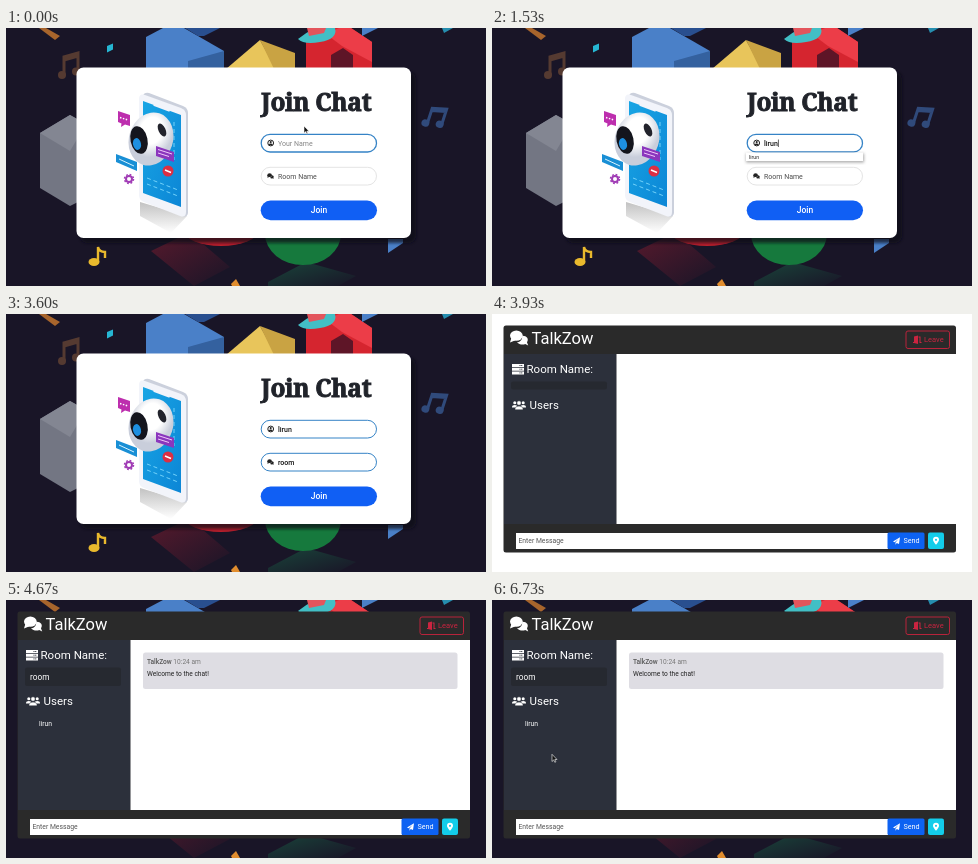
Animation of 480 by 258 pixels, one loop 8 s. Source, as an HTML page:

```html
<!DOCTYPE html>
<html lang="en">
<head>
<meta charset="utf-8">
<title>Join a chat room</title>
<style>
  html, body { margin: 0; width: 100%; height: 100%; overflow: hidden; background: #191527; }
  svg { display: block; width: 100%; height: 100%; }
  text { font-family: Roboto, sans-serif; white-space: pre; }
  .title { font: 900 24.5px "Noto Serif", serif; letter-spacing: -.35px; }
  .small { font-size: 7px; }
  .heading { font-size: 11.5px; }
</style>
</head>
<body>
<svg viewBox="0 0 480 258">
  <defs>
    <linearGradient id="screen" x2="1" y2="1">
      <stop stop-color="#18a5e4"/><stop offset="1" stop-color="#0c86d6"/>
    </linearGradient>
    <linearGradient id="floor" x2="0" y2="1">
      <stop stop-color="#999" stop-opacity=".6"/><stop offset="1" stop-color="#999" stop-opacity="0"/>
    </linearGradient>
    <linearGradient id="redGlow" x2="1" y2="1">
      <stop stop-color="#54192c"/><stop offset="1" stop-color="#191527"/>
    </linearGradient>
    <linearGradient id="greenGlow" x2="1" y2="1">
      <stop stop-color="#19443a"/><stop offset="1" stop-color="#191527"/>
    </linearGradient>
    <radialGradient id="ball" cx=".45" cy=".35">
      <stop offset=".5" stop-color="#fff"/><stop offset="1" stop-color="#c9cedb"/>
    </radialGradient>
    <filter id="blur" x="-20%" y="-20%" width="140%" height="140%"><feGaussianBlur stdDeviation="1.6"/></filter>
    <g id="bubbles">
      <ellipse cx="4.6" cy="4" rx="4.6" ry="3.7"/>
      <path d="M1 5.5L0 9 4 7.4ZM8.8 4.2C9 7.4 6.8 8.6 5 8.8 7 11 10 10.5 11 10L13.2 11 12.3 8.8C14 6.5 12 4 8.8 4.2Z"/>
    </g>
    <g id="note">
      <path d="M6 24V6L20 2V20M6 9L20 5" fill="none" stroke="currentColor" stroke-width="3"/>
      <g fill="currentColor"><circle cx="4" cy="24" r="4"/><circle cx="18" cy="20.500" r="4"/></g>
    </g>
    <g id="person"><circle cy="-2.3" r="2.2"/><path d="M-4 4.5V3.5Q-4 .8 0 .8T4 3.5V4.5Z"/></g>
  </defs>

  <g id="backdrop">
    <path fill="#191527" d="M0 0H480V258H0Z"/>
    <path fill="#a8652c" d="M33 0H40L54 8 49 12Z"/>
    <path fill="#26b6d3" d="M101 18L107 15.5V21.5L101 24.5Z"/>
    <path fill="#4a80c8" d="M140 9L157 0H178L218 23V45H140Z"/>
    <path fill="#34619f" d="M182 33L218 23V45H182Z"/>
    <path fill="#294f8f" d="M179 0H214L198 8 192 8Z"/>
    <path fill="#e8c55b" d="M220 41L254 12 270 41Z"/>
    <path fill="#c9a343" d="M254 12L289 25V41H268Z"/>
    <path fill="#d5252f" d="M300 12L318 0H345L366 14V45H300Z"/>
    <path fill="#ec3d48" d="M320 6L333 0H345L366 14V34L336 18Z"/>
    <path fill="#5e1527" d="M325 27L337 20 347 27V41H325Z"/>
    <path fill="#4a80c8" d="M356 0H372L356 8Z"/>
    <path fill="#42bfc5" d="M292 11Q301 4 309 0H329Q332 11 314 14 298 17 292 11Z"/>
    <path fill="#e3555c" d="M301 0H320L318 5 303 8Z"/>
    <path fill="#268eaf" d="M436 0H447L438 5Z"/>
    <use href="#note" transform="translate(52 23)" color="#553a31"/>
    <use href="#note" transform="translate(418 76) rotate(18 11 12) scale(1 .9)" color="#304a7b"/>
    <path fill="#737683" d="M34 105L64 87 80 96V170L64 178 34 160Z"/>
    <path fill="#838692" d="M34 105L64 87 80 96 64 123Z"/>
    <path fill="none" stroke="#e9b92d" stroke-width="2.4" d="M92 234V219Q93 224 99 224V230"/>
    <ellipse cx="88" cy="234" rx="5.500" ry="4" fill="#e9b92d"/>
    <path fill="url(#redGlow)" d="M145 223L172 210H190L224 239 188 258Z"/>
    <path fill="url(#greenGlow)" d="M262 254L300 234 350 248 332 258H262Z"/>
    <ellipse cx="215" cy="202" rx="38" ry="16" fill="#bd202e"/>
    <ellipse cx="297" cy="206" rx="38" ry="31" fill="#16793d"/>
    <path fill="#4a80c8" d="M382 211H397V215L382 225Z"/>
    <path fill="#e18d2e" d="M225 256L230 251 234 258H226Z"/>
  </g>

  <g id="join">
    <rect x="74" y="44" width="336" height="171" rx="7" fill="#0c0a14" opacity=".7" filter="url(#blur)"/>
    <rect x="70.500" y="39.500" width="334.500" height="170.500" rx="7" fill="#fff"/>

    <path fill="url(#floor)" d="M134 174L181 188 165 205 134 188Z"/>
    <path fill="#cbd0dc" d="M137 68Q138 64 143 65L177 78Q182 80 182 85V185Q181 190 176 188L137 172Z"/>
    <path fill="#f2f4fa" d="M133 71Q133 65 139 67L175 80Q180 82 180 87V184Q180 190 174 188L138 174Q133 172 133 167Z"/>
    <path fill="url(#screen)" d="M137 73L175 87V179L137 165Z"/>
    <path stroke="#f2f4fa" stroke-width="4" d="M148 76L164 82"/>
    <path fill="none" stroke="#72d2fa" stroke-dasharray="4 3" d="M141 150L172 162M141 156L172 168M168 94V132"/>
    <ellipse cx="145" cy="111" rx="22" ry="27" fill="url(#ball)" transform="rotate(18 145 111)"/>
    <ellipse cx="156" cy="102" rx="3.500" ry="7" fill="#22232c" transform="rotate(-25 156 102)"/>
    <ellipse cx="133" cy="112" rx="8.500" ry="14" fill="#14151d" transform="rotate(-12 133 112)"/>
    <ellipse cx="131" cy="116" rx="4" ry="6" fill="#1d8fe0" transform="rotate(-12 131 116)"/>
    <path fill="#bd2eae" d="M112 83L124 87V98L119 96.500 115 99 115.500 95.500 112 94Z"/>
    <path stroke="#fff" stroke-width="1.500" stroke-dasharray="1.500" d="M114 89.500L122 92"/>
    <path fill="#198fd5" d="M110 126L131 134V143L110 134Z"/>
    <path stroke="#d7f3ff" d="M113 131L128 138"/>
    <path fill="#8b36bd" d="M150 118L168 124V134L150 128Z"/>
    <path stroke="#f0c7fa" d="M152 121.500L166 126M152 125L163 128.500"/>
    <circle cx="162" cy="143" r="5.500" fill="#dc2f43"/>
    <path stroke="#fff" stroke-width="1.500" d="M159 142L165 144.500"/>
    <circle cx="123" cy="151" r="3" fill="none" stroke="#a03bb5" stroke-width="2"/>
    <circle cx="123" cy="151" r="4.500" fill="none" stroke="#a03bb5" stroke-width="1.500" stroke-dasharray="1.770"/>

    <text class="title" x="255" y="82.700" fill="#20232a" stroke="#20232a" stroke-width=".9">Join Chat</text>
    <rect id="nameBox" x="255.200" y="106.300" width="115.300" height="17.700" rx="8.850" fill="#fff"/>
    <rect id="roomBox" x="255.200" y="139.300" width="115.300" height="17.700" rx="8.850" fill="#fff"/>
    <circle cx="264.700" cy="115" r="2.900" fill="none" stroke="#222"/>
    <use href="#person" transform="translate(264.700 115.200) scale(.48)" fill="#222"/>
    <use href="#bubbles" transform="translate(261.300 145.200) scale(.5)" fill="#222"/>
    <text id="nameText" class="small" x="272" y="117.500"></text>
    <text id="roomText" class="small" x="272" y="150.700"></text>
    <path id="caret" stroke="#222" stroke-width=".7" d="M0 -6V1.500"/>
    <rect x="254.700" y="172.500" width="116.300" height="19.700" rx="9.850" fill="#105ff4"/>
    <text x="313" y="185.300" font-size="8.500" font-weight="500" fill="#fff" text-anchor="middle">Join</text>
    <g id="suggest">
      <rect x="254" y="1" width="118" height="9" fill="#555" opacity=".5" filter="url(#blur)"/>
      <path fill="#fff" d="M254 0H371V8.500H254Z"/>
      <text id="suggestText" x="257" y="6" font-size="5.200" fill="#222"></text>
    </g>
  </g>

  <g id="chat">
    <path id="blank" fill="#fff" d="M0 0H480V258H0Z"/>
    <rect x="11.500" y="11.500" width="452.500" height="227" rx="2.500" fill="#2a2a2a"/>
    <path fill="#2c303b" d="M12 40H124.500V210H12Z"/>
    <path fill="#fff" d="M124.500 40H464V210H124.500Z"/>
    <g fill="#fff">
      <use href="#bubbles" transform="translate(18 16) scale(1.380 1.400)"/>
      <text x="39.500" y="30" font-size="16.500">TalkZow</text>
      <path d="M20 50H32V53H20ZM20 53.700H32V56.700H20ZM20 57.400H32V60.400H20Z"/>
      <path stroke="#2c303b" stroke-dasharray="1 .7" d="M27.500 51.500H31M27.500 55.200H31M27.500 58.900H31"/>
      <text class="heading" x="34.500" y="59">Room Name:</text>
      <g id="users">
        <use href="#person" transform="translate(22.800 -4.600) scale(.7)"/>
        <use href="#person" transform="translate(31.200 -4.600) scale(.7)"/>
        <use href="#person" transform="translate(27 -3.700)" stroke="#2c303b" stroke-width=".5"/>
        <text class="heading" x="37.500">Users</text>
      </g>
    </g>
    <rect id="roomBar" x="19" y="67.500" width="96" rx="2" fill="#262930"/>
    <g id="loaded">
      <text x="24" y="80" font-size="8.300" fill="#fff">room</text>
      <text x="33" y="126" font-size="6.800" fill="#fff">lirun</text>
      <rect x="137" y="52.500" width="314.500" height="36.500" rx="2.500" fill="#dedde3"/>
      <text x="141" y="63.500" font-size="6.600" fill="#777"><tspan font-weight="500" fill="#555">TalkZow</tspan> 10:24 am</text>
      <text x="141" y="75.500" font-size="6.600" fill="#222">Welcome to the chat!</text>
    </g>
    <g fill="#cb2440">
      <rect x="414" y="17" width="43.500" height="17.500" rx="2" fill="none" stroke="#b8233b"/>
      <path d="M421 29V28H422V22.500L426 21.500V30L422 29ZM426.500 22.500H428.500V28H429.500V29H427.500V23.500H426.500Z"/>
      <text x="432" y="28.300" font-size="7.500">Leave</text>
    </g>
    <path fill="#fff" d="M24 219H396V235H24Z"/>
    <text x="26.500" y="229.300" font-size="6.800" fill="#555">Enter Message</text>
    <rect x="395.500" y="218.500" width="37" height="16.500" rx="1.500" fill="#0d62f2"/>
    <path fill="#fff" d="M401 227.500L408 223.300 407 230 404.700 229 403.500 230.700V228.500L406.500 225 402.700 228.300Z"/>
    <text x="411.500" y="229.300" font-size="7.200" fill="#fff">Send</text>
    <rect x="436" y="218.500" width="16" height="16.500" rx="2" fill="#13cdea"/>
    <path fill="#fff" fill-rule="evenodd" d="M444 230.800Q441 227.500 441 225.800A3 3 0 0 1 447 225.800Q447 227.500 444 230.800ZM444 224.700A1.100 1.100 0 1 0 444 226.900 1.100 1.100 0 0 0 444 224.700Z"/>
  </g>

  <path id="cursor" fill="#111" stroke="#fff" stroke-width=".6" d="M0 0V7.200L1.700 5.600 2.800 8 3.900 7.500 2.800 5.200H5Z"/>
</svg>

<script>
const LOOP = 8000, CHAT_OPENS = 3930, CHAT_LOADS = 4000, BLINK = 500;
const el = id => document.getElementById(id);
const show = (id, on) => el(id).setAttribute('display', on ? 'inline' : 'none');

const fields = [
  { id: 'name', hint: 'Your Name', value: 'lirun', keys: [930, 1070, 1200, 1330, 1470],
    focus: 0, close: 1600, blur: 1670, bottom: 124.5 },
  { id: 'room', hint: 'Room Name', value: 'room', keys: [2070, 2200, 2270, 2400],
    focus: 1670, close: 2470, blur: 2730, bottom: 157.5 }
];

// Times and positions of the pointer; each leg is eased.
const pointerPath = [
  [5530, 298, 98], [6330, 46, 132], [6400, 47, 136], [6600, 47, 136], [6730, 60, 154.3]
];

function pointerAt(t) {
  if (t < 70) return [298, 98];
  if (t < pointerPath[0][0]) return null;
  const next = pointerPath.findIndex(p => p[0] > t);
  if (next < 0) return pointerPath.at(-1).slice(1);
  const [t0, x0, y0] = pointerPath[next - 1], [t1, x1, y1] = pointerPath[next];
  const k = (t - t0) / (t1 - t0), e = k * k * (3 - 2 * k);
  return [x0 + (x1 - x0) * e, y0 + (y1 - y0) * e];
}

function drawField(f, t) {
  const count = f.keys.filter(k => k <= t).length;
  const focused = t >= f.focus && t < f.blur;
  const box = el(f.id + 'Box'), text = el(f.id + 'Text');
  text.textContent = count ? f.value.slice(0, count) : f.hint;
  text.setAttribute('fill', count ? '#111' : focused ? '#858585' : '#4c4c4c');
  text.setAttribute('font-weight', count ? 500 : 400);
  box.setAttribute('stroke', focused || count ? '#3583c6' : '#e4e4e4');
  box.setAttribute('stroke-width', focused ? 1.3 : 1);
  if (count && t < f.close) {
    show('suggest', true);
    show('caret', Math.floor(t / BLINK) % 2);
    el('suggest').setAttribute('transform', `translate(0 ${f.bottom})`);
    el('suggestText').textContent = f.value;
    const x = 272.6 + text.getComputedTextLength();
    el('caret').setAttribute('transform', `translate(${x} ${text.getAttribute('y')})`);
  }
}

function draw(t) {
  const inChat = t >= CHAT_OPENS, loaded = t >= CHAT_LOADS;
  show('join', !inChat);
  show('chat', inChat);
  show('blank', !loaded);
  show('loaded', loaded);
  show('suggest', false);
  show('caret', false);
  if (!inChat) fields.forEach(f => drawField(f, t));
  el('roomBar').setAttribute('height', loaded ? 18.5 : 8);
  el('users').setAttribute('transform', `translate(0 ${loaded ? 105 : 95})`);

  const pointer = pointerAt(t);
  show('cursor', pointer);
  if (pointer) el('cursor').setAttribute('transform', `translate(${pointer})`);
}

const start = performance.now();
(function tick() {
  draw((performance.now() - start) % LOOP);
  requestAnimationFrame(tick);
})();
</script>
</body>
</html>
```
